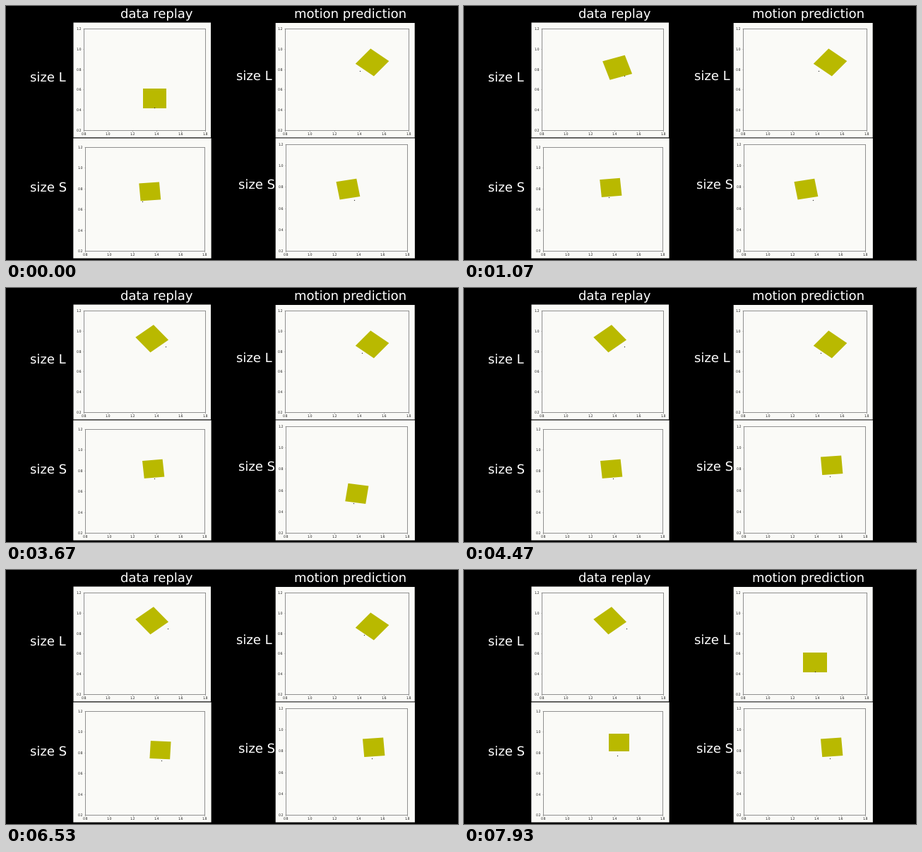
These frames come from a looping animation (640 px wide and 360 px high, 8000 ms). A matplotlib script:

```python
import numpy as np
import matplotlib.pyplot as plt
from matplotlib.animation import FuncAnimation
from matplotlib.patches import Polygon, Rectangle

W, H, DPI = 640, 360, 100
LOOP, STEP = 8000, 50
PT = 72 / DPI  # points per pixel
PAPER, BOX, LINE, INK = "#fafaf7", "#b9b900", "#858585", "#262626"
SIDE_L, SIDE_S = 0.193, 0.170
DRIFT = 5.3e-6  # sideways creep of the resting dot, units per ms

plt.rcParams["font.family"] = "DejaVu Sans"
plt.rcParams["text.hinting"] = "none"
fig = plt.figure(figsize=(W / DPI, H / DPI), dpi=DPI, facecolor="black")


def label(x, y, text):
    fig.text(x / W, 1 - y / H, text, color="white", fontsize=18 * PT,
             ha="left", va="baseline")


def to_fig(left, top, right, bottom):
    """Pixel edges to figure-fraction x, y, width, height."""
    return left / W, 1 - bottom / H, (right - left) / W, (bottom - top) / H


def make_axes(paper, frame):
    x, y, w, h = to_fig(*paper)
    fig.add_artist(Rectangle((x, y), w, h, transform=fig.transFigure,
                             fc=PAPER, lw=0, zorder=-1, snap=False))
    ax = fig.add_axes(to_fig(*frame), facecolor=PAPER)
    ax.set(xlim=(0.8, 1.8), ylim=(0.2, 1.2),
           xticks=np.linspace(0.8, 1.8, 6), yticks=np.linspace(0.2, 1.2, 6))
    ax.xaxis.set_major_formatter("{x:.1f}")
    ax.yaxis.set_major_formatter("{x:.1f}")
    ax.tick_params(length=1.5 * PT, width=0.6 * PT, pad=1.4 * PT,
                   labelsize=4.7 * PT, color=LINE, labelcolor=INK)
    for spine in ax.spines.values():
        spine.set(linewidth=0.9 * PT, color=LINE)
    return ax


class Push:
    """Eased move between two poses (box x, y, angle, dot x, y) along a bowed path."""

    def __init__(self, t0, span, start, end, bow=(0, 0, 0, 0, 0), drift=DRIFT):
        self.t0, self.span, self.drift = t0, span, drift
        self.start, self.end, self.bow = map(np.array, (start, end, bow))

    def pose(self, t):
        u = min((t - self.t0) / self.span, 1)
        s = u * u * (3 - 2 * u)
        p = self.start + (self.end - self.start) * s + self.bow * np.sin(np.pi * s)
        p[3] += self.drift * max(t - self.t0 - self.span, 0)
        return p


def hold(t0, pose):
    return Push(t0, 1, pose, pose)


class Panel:
    def __init__(self, ax, side, *pushes):
        self.side, self.pushes = side, pushes
        self.box = ax.add_patch(Polygon(np.zeros((4, 2)), fc=BOX, lw=0, zorder=3))
        self.dot, = ax.plot([], [], "o", ms=1.3 * PT, mew=0, color="#303030", zorder=4)

    def update(self, t):
        push = [p for p in self.pushes if p.t0 <= t][-1]
        x, y, deg, dot_x, dot_y = push.pose(t)
        a = np.radians(deg + 45 + 90 * np.arange(4))
        r = self.side / np.sqrt(2)
        self.box.set_xy(np.column_stack([x + r * np.cos(a), y + r * np.sin(a)]))
        self.dot.set_data([dot_x], [dot_y])


REST_L = (1.384, .514, 0, 1.384, .419)
REST_S = (1.384, .510, 0, 1.380, .424)

panels = [
    Panel(make_axes((95.5, 23.5, 290, 186.3), (110, 32, 282, 176)), SIDE_L,
          Push(0, 1580, REST_L, (1.362, .924, 39.5, 1.465, .845),
               bow=(.075, 0, -15, .05, 0))),
    Panel(make_axes((381.7, 24, 578.7, 186.4), (395, 32, 570, 176)), SIDE_L,
          hold(0, (1.506, .867, -39.5, 1.406, .782)),
          hold(7870, REST_L)),
    Panel(make_axes((95.3, 187.5, 290.6, 357.6), (112, 200, 281, 347)), SIDE_S,
          Push(0, 1420, (1.343, .772, 4.5, 1.278, .673), (1.372, .817, 5.4, 1.367, .724)),
          Push(5390, 1545, REST_S, (1.434, .900, 0, 1.422, .771),
               bow=(.01, 0, -5, .04, .04), drift=0)),
    Panel(make_axes((381.7, 187.4, 578.9, 357.6), (396, 196, 568, 347)), SIDE_S,
          hold(0, (1.314, .779, 10, 1.365, .675)),
          Push(3380, 1000, REST_S, (1.525, .834, 4.4, 1.511, .728),
               bow=(-.043, 0, -17, -.085, 0), drift=0)),
]

label(162, 17, "data replay")
label(407.5, 17, "motion prediction")
label(33.5, 106.3, "size L")
label(326.5, 104.6, "size L")
label(34.3, 262.5, "size S")
label(329, 259, "size S")


def draw(n):
    for panel in panels:
        panel.update(n * STEP)
    return []


anim = FuncAnimation(fig, draw, frames=LOOP // STEP, interval=STEP,
                     repeat=True, repeat_delay=0, blit=False)
plt.show()
```
